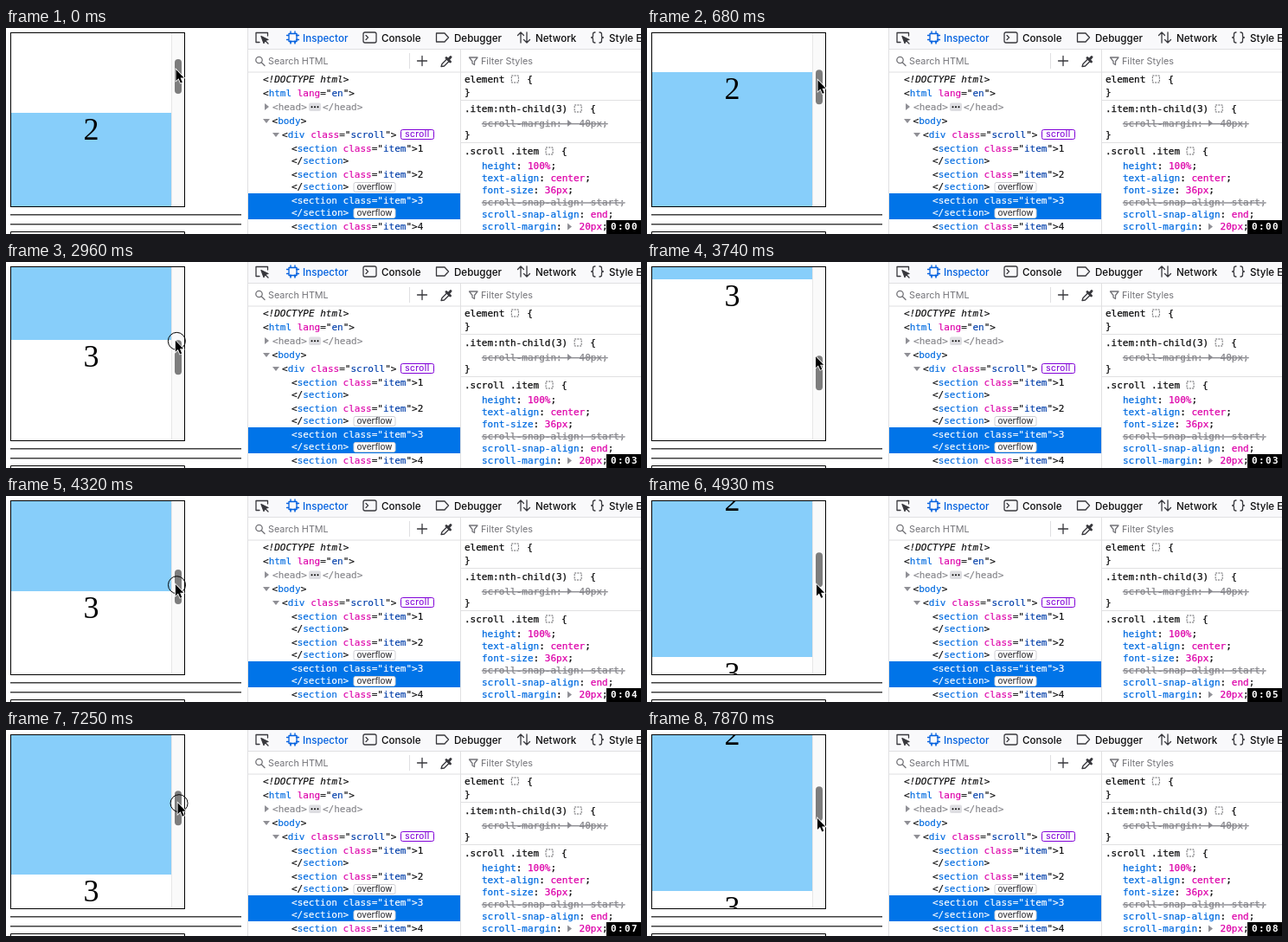
These frames come from a looping animation (734 by 238 pixels, 8 s). An HTML page:

```html
<!DOCTYPE html>
<html lang="en">
<head>
<meta charset="utf-8">
<title>Scroll snapping</title>
<style>
  html, body { margin: 0; width: 100%; height: 100%; overflow: hidden; background: #fff; }
  svg { display: block; }
  text { white-space: pre; }
  .mono { font: 11px "DejaVu Sans Mono", monospace; color: #0c0c0d; }
  .mono text { fill: currentColor; stroke: currentColor; stroke-width: .15; }
  .mono tspan { fill: currentColor; stroke: currentColor; }
  #rules text { stroke-width: .25; }
  .ui { font: 500 11.6px Inter, sans-serif; fill: #0c0c0d; }
  .hint { font: 10.8px Inter, sans-serif; fill: #737378; }
  .mono .badge { font: 10px Inter, sans-serif; color: #38383d; text-anchor: middle; }
  .mono .purple { color: #8000d7; letter-spacing: .5px; }
  .num { font: 36px "Liberation Serif", serif; text-anchor: middle; }
  .clock { font: bold 11px "DejaVu Sans Mono", monospace; letter-spacing: 1.38px; fill: #fff; }
  .doctype { font-style: italic; }
  .name { color: #006be0; }
  .attr { color: #dd00a9; }
  .val { color: #003eaa; }
  .selected, .selected tspan { color: #fff; }
  .off, .off tspan { color: #85858a; }
  .strike { text-decoration: line-through; }
  .icon { fill: none; stroke: #38383d; stroke-width: 1.3; stroke-linejoin: round; stroke-linecap: round; }
  .active { stroke: #0060df; }
  .soft { stroke: #737378; }
  .line { fill: #e0e0e2; }
  .twisty { fill: #8f8f95; }
</style>
</head>
<body>
<svg width="734" height="238" viewBox="0 0 734 238">
  <!-- page -->
  <rect x="5.5" y="5.5" width="201" height="201" fill="#fff" stroke="#000"/>
  <svg x="6" y="6" width="200" height="200">
    <g id="items"></g>
    <rect x="185" width="15" height="200" fill="#fafafa"/>
    <rect x="185" width="1" height="200" fill="#e6e6e6"/>
    <rect id="thumb" x="189" width="8" height="40" rx="4" fill="#7d7d7d"/>
  </svg>
  <path d="M5 215.8H272M5 226.8H272" stroke="#404040" stroke-width="1.6"/>
  <path d="M5.500 238V235.500H206.500V238" fill="none" stroke="#000"/>

  <!-- inspector -->
  <rect x="280" width="454" height="24" fill="#f9f9fb"/>
  <g class="line">
    <rect x="279" width="1" height="238"/>
    <rect x="280" y="24" width="454" height="1"/>
    <rect x="280" y="50.500" width="454" height="1"/>
    <rect x="466" y="29" width="1" height="18"/>
    <rect x="525" y="25" width="1" height="213"/>
    <rect x="526" y="83" width="208" height="1"/>
    <rect x="526" y="132" width="208" height="1"/>
  </g>
  <g class="icon">
    <path d="M293 16.5H289V5.5H302.5V9"/>
    <path d="M295 9.500L303 13.500L299.500 14.500L298 17.500ZM299.500 14.500L303 18" fill="#38383d"/>
    <g class="active">
      <rect x="327" y="6.500" width="9" height="9"/>
      <path d="M329 4V18M334 4V18M324.500 8.500H338.500M324.500 13.500H338.500" stroke-dasharray="2 9"/>
      <path d="M329 16V18M334 16V18M336.500 8.500H338.500M336.500 13.500H338.500"/>
    </g>
    <rect x="413" y="5" width="15" height="12" rx="2"/>
    <path d="M416 8.500L418.500 11L416 13.500"/>
    <path d="M497.500 6H507L511.500 11L507 16H497.500Z"/>
    <path d="M595 17V5M591.500 8.500L595 5L598.500 8.500M602 5V17M598.500 13.500L602 17L605.500 13.500"/>
    <path d="M681 5Q678.500 5 678.500 7V9Q678.500 11 676.500 11Q678.500 11 678.500 13V15Q678.500 17 681 17"/>
    <path d="M686 5Q688.500 5 688.500 7V9Q688.500 11 690.500 11Q688.500 11 688.500 13V15Q688.500 17 686 17"/>
    <path d="M475.500 38H486.500M481 32.500V43.500"/>
    <path d="M503 44.500L504 41.500L509.500 36L512 38.500L506.500 44Z"/>
    <path d="M509 34.500L513.500 39M511.500 36.500L514 33.500" stroke-width="2.800"/>
    <g class="soft">
      <circle cx="292.500" cy="37" r="3.700"/><path d="M295.200 39.700L299 43.500"/>
      <path d="M535.500 34H545L541.500 38.500V42.500L539 41V38.500Z"/>
    </g>
  </g>
  <g class="ui">
    <text x="343" y="16" fill="#0060df">Inspector</text>
    <text x="434" y="16">Console</text>
    <text x="518" y="16">Debugger</text>
    <text x="612" y="16">Network</text>
    <text x="697" y="16">Style Editor</text>
  </g>
  <g class="hint">
    <text x="303" y="42">Search HTML</text>
    <text x="549" y="42">Filter Styles</text>
  </g>
  <rect x="280" y="191" width="245" height="30" fill="#0074e8"/>
  <g id="tree" class="mono"></g>
  <g id="rules" class="mono"></g>

  <!-- overlay -->
  <rect x="694" y="222" width="40" height="16"/>
  <text id="clock" class="clock" x="699" y="233.300"></text>
  <circle id="press" r="10" fill="none" stroke="#000"/>
  <path id="cursor" d="M0 0V13L3 10.200L5.300 15.600L7.300 14.700L5.100 9.500H9.200Z" stroke="#fff" stroke-width="1.600" paint-order="stroke"/>
</svg>
<script>
const $ = id => document.getElementById(id);
const span = (cls, s) => `<tspan class="${cls}">${s}</tspan>`;
const text = (x, y, s, cls = '') => `<text x="${x}" y="${y}" class="${cls}">${s}</text>`;
const right = (x, y) => `<path class="twisty" d="M${x} ${y - 4}l5 4l-5 4Z"/>`;
const down = (x, y) => `<path class="twisty" d="M${x - 4} ${y - 2}h8l-4 5Z"/>`;

// markup tree
const open = (tag, attr, value) => '&lt;' + span('name', tag) +
  (attr ? ` ${span('attr', attr)}="${span('val', value)}"` : '') + '&gt;';
const close = tag => `&lt;/${span('name', tag)}&gt;`;
const badge = (x, y, w, label, stroke, cls = '') =>
  `<rect x="${x + .5}" y="${y + .5}" width="${w - 1}" height="11" rx="2" fill="#fff" stroke="${stroke}"/>` +
  text(x + w / 2, y + 9.3, label, 'badge ' + cls);

let tree = text(297, 63, '&lt;!DOCTYPE html&gt;', 'doctype') +
  text(297, 79, open('html', 'lang', 'en')) +
  right(299, 91) + text(308, 95, open('head'), 'off') +
  '<rect x="350" y="86.5" width="14" height="9.5" rx="2" fill="#dedee2"/>' +
  [-1, 0, 1].map(i => `<circle cx="${357 + 3.5 * i}" cy="91.2" r="1"/>`).join('') +
  text(366, 95, close('head'), 'off') +
  down(301, 107) + text(307.5, 111, open('body')) +
  down(312, 123) + text(319, 127, open('div', 'class', 'scroll')) +
  badge(456, 117, 39, 'scroll', '#8000d7', 'purple');
for (let n = 1; n <= 4; n++) {
  const y = 113 + 30 * n, cls = n === 3 ? 'selected' : '';
  tree += text(330, y, open('section', 'class', 'item') + n, cls) +
    text(330, y + 14, close('section'), cls) +
    (n > 1 ? badge(401.5, y + 5, 49, 'overflow', '#cfcfd4') : '');
}
$('tree').innerHTML = tree;

// style rules
const selector = (y, s) => {
  const x = 530 + s.length * 6.62;
  return text(530, y, s) + text(x + 26, y, '{') +
    `<rect x="${x + 8}" y="${y - 8}" width="8" height="8" fill="none" stroke="#606064" stroke-dasharray="2 1.2"/>`;
};
const prop = (y, name, value, cls) =>
  text(550, y, `${span('name', name)}: ${span('attr', value)};`, cls);
const margin = (y, value, cls) => right(649, y - 4) +
  prop(y, 'scroll-margin', value, cls).replace(': ', ':   ');

$('rules').innerHTML = selector(63, 'element') + text(530, 78, '}') +
  selector(97, '.item:nth-child(3)') + margin(114, '40px', 'off strike') + text(530, 127, '}') +
  selector(146, '.scroll .item') +
  ['height: 100%', 'text-align: center', 'font-size: 36px', 'scroll-snap-align: start', 'scroll-snap-align: end']
    .map((s, i) => prop(163 + 14.1 * i, ...s.split(': '), s.endsWith('start') ? 'off strike' : '')).join('') +
  margin(233.4, '20px');

$('items').innerHTML = [0, 1, 2, 3].map(i =>
  `<rect y="${i * 200}" width="185" height="200" fill="${i % 2 ? '#87cefa' : '#fff'}"/>` +
  `<text class="num" x="92.5" y="${i * 200 + 31}">${i + 1}</text>`).join('');

// Motion: each value is its first position plus a sum of eased shifts.
const ratio = .26; // thumb travel per scrolled pixel
const origin = { scroll: 108, x: 198, y: 48.5 };
const last = { ...origin };
const shifts = [], presses = [];

const linear = p => p;
const smooth = p => p * p * (3 - 2 * p);
const out = power => p => 1 - (1 - p) ** power;

function shift(key, from, to, by, ease) {
  shifts.push({ key, from, to, by, ease });
  last[key] += by;
}
function move(from, to, dx, dy, ease = smooth) {
  shift('x', from, to, dx, ease);
  shift('y', from, to, dy, ease);
}
function drag(from, to, dx, dy, ease = smooth) {
  move(from, to, dx, dy, ease);
  shift('scroll', from, to, dy / ratio, ease);
}
const glide = (from, by) => shift('scroll', from, from + 195, by, out(1.8));
const snap = from => glide(from, 20 + 200 * Math.round((last.scroll - 20) / 200) - last.scroll);
const press = (from, to) => presses.push({ from, to });

drag(70, 740, 1, 12.5);
drag(880, 1130, 0, 6);
snap(1375);
move(1749, 1750, -.5, -.5);

press(2590, 3740);
drag(2570, 3380, -2, 43.2, out(1.3));
snap(3755);
move(3755, 3930, 1, -7);

press(4260, 4910); // click in the track above the thumb
glide(4240, -200);
move(5460, 5720, 3, -11);

press(5790, 6520);
drag(5820, 6340, 0, -12, linear);
snap(6535);

press(7140, 7680);
drag(7130, 7530, -2, 22.7);
snap(7675);

function at(key, t) {
  return shifts.filter(s => s.key === key && s.from < t).reduce((sum, s) =>
    sum + s.by * s.ease(Math.min(1, (t - s.from) / (s.to - s.from))), origin[key]);
}

function draw(t) {
  const scroll = Math.round(at('scroll', t)), x = at('x', t), y = at('y', t);
  const place = (id, dx, dy) => $(id).setAttribute('transform', `translate(${dx} ${dy})`);
  place('items', 0, -scroll);
  place('thumb', 0, 2 + ratio * scroll);
  place('cursor', x - 1.5, y - .5);
  place('press', x, y);
  const held = presses.some(p => t >= p.from && t < p.to);
  $('press').style.visibility = held ? 'visible' : 'hidden';
  $('clock').textContent = '0:0' + Math.floor((t * 1.008 + 70) / 1000);
}

const start = performance.now();
function tick() {
  draw((performance.now() - start) % 8000);
  requestAnimationFrame(tick);
}
tick();
</script>
</body>
</html>
```
